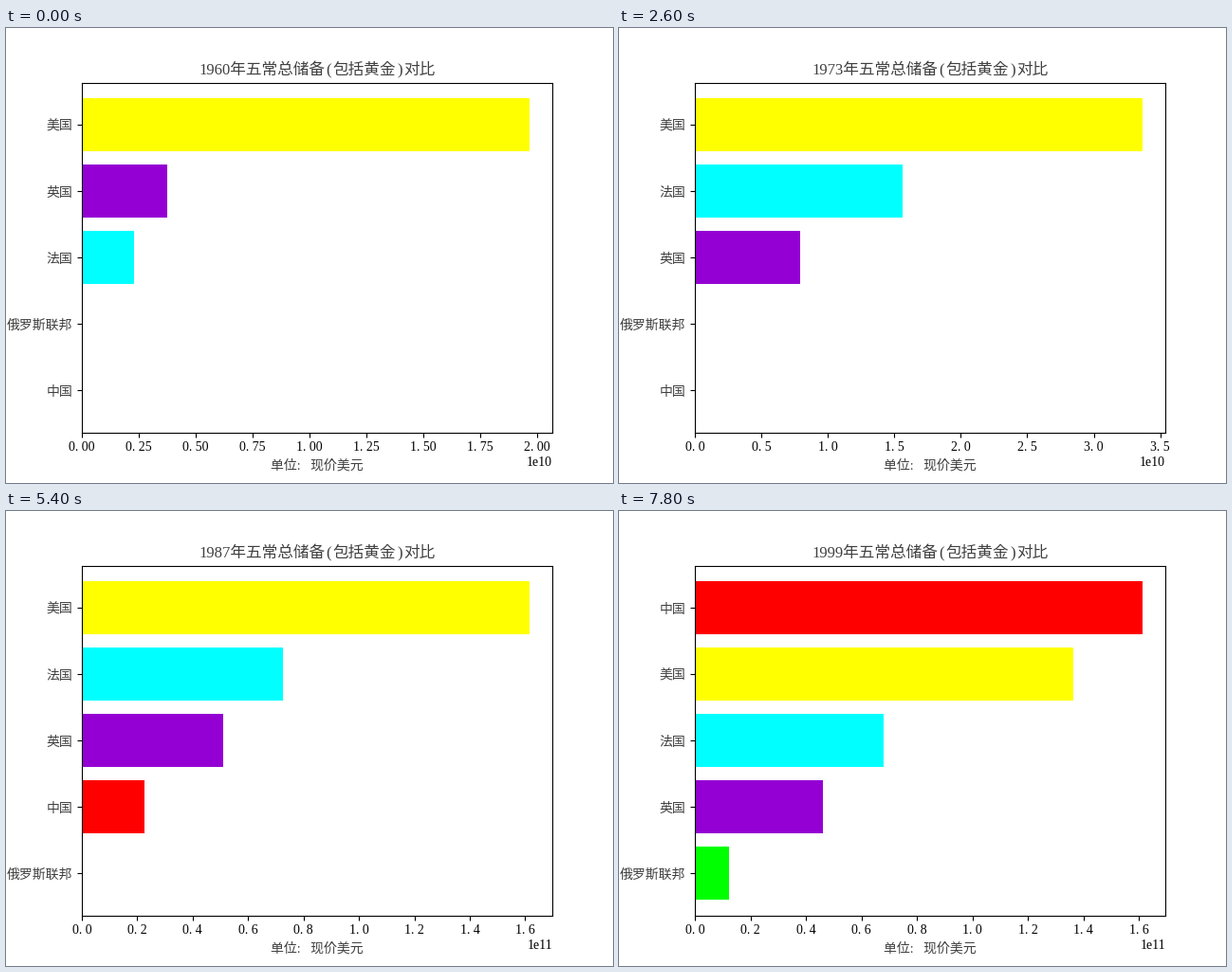
A matplotlib script that plays this animation: 640 px wide and 480 px high, repeating every 8 s.

```python
import math

import numpy as np
import matplotlib.pyplot as plt
from matplotlib.animation import FuncAnimation

W, H, DPI = 640, 480, 100
LEFT, RIGHT, BOTTOM = 80, 576, 427.2
FIRST, LAST = 1960, 1999
INK = "0.25"

plt.rcParams["font.family"] = ["Liberation Serif", "Noto Sans CJK JP"]

# Turning points of the leading reserve, in billions of dollars.
LEADER = {60: 19.67, 62: 17.2, 67: 14.9, 68: 17.85, 71: 14.7, 72: 20.6,
          73: 33.7, 74: 55.7, 75: 43.2, 76: 44.2, 78: 69.5, 79: 143.2,
          80: 171.4, 81: 124, 82: 143.4, 84: 104.8, 87: 161.7, 90: 173.1,
          91: 159.2, 95: 176, 97: 134.8, 99: 136.4}

# The others as shares of the leader at common years; early gaps are zero.
KNOTS = [60, 67, 68, 73, 77, 79, 84, 87, 91, 93, 97, 99]
COUNTRIES = [
    ("中国", "#ff0000", [0.203, 0.139, 0.302, 0.166, 1.086, 1.183]),
    ("俄罗斯联邦", "#00ff00", [0.06, 0.131, 0.09]),
    ("英国", "#9400d3", [0.191, 0.181, 0.152, 0.235, 0.446, 0.203,
                       0.146, 0.315, 0.305, 0.267, 0.279, 0.338]),
    ("法国", "#00ffff", [0.117, 0.471, 0.278, 0.464, 0.424, 0.415,
                       0.44, 0.449, 0.379, 0.332, 0.406, 0.498]),
    ("美国", "#ffff00", [1] * len(KNOTS)),
]


def reserves(year):
    """Rows of (value, name, colour), smallest first."""
    y = year - 1900
    lead = np.interp(y, list(LEADER), list(LEADER.values()))
    rows = []
    for name, color, shares in COUNTRIES:
        padded = [0] * (len(KNOTS) - len(shares)) + shares
        rows.append((lead * np.interp(y, KNOTS, padded), name, color))
    return sorted(rows, key=lambda row: row[0])


fig = plt.figure(figsize=(W / DPI, H / DPI), dpi=DPI, facecolor="white")


def put(x, y, text, size=10, ha="left", color=INK):
    """Write text with its baseline at stage pixel (x, y)."""
    fig.text(x / W, 1 - y / H, text, fontsize=size, ha=ha, va="baseline", color=color)


def nice_step(top):
    """Smallest round step giving at most nine intervals."""
    raw = top / 9
    unit = 10 ** math.floor(math.log10(raw))
    return next(m * unit for m in (1, 2, 2.5, 5, 10) if m * unit >= raw)


def draw_title(year):
    em = 12 * DPI / 72
    x0 = (LEFT + RIGHT) / 2 - 7.5 * em
    parts = [(0, f"{year}年五常总储备", "left"), (8.25, "(", "center"),
             (8.5, "包括黄金", "left"), (12.75, ")", "center"), (13, "对比", "left")]
    for offset, text, ha in parts:
        put(x0 + offset * em, 49, text, 12, ha)


def draw_x_labels(top):
    power = math.floor(math.log10(top))
    limit = top / 10 ** power
    step = nice_step(limit)
    digits = 2 if abs(step - 0.25) < 1e-9 else 1 if step < 0.99 else 0
    ticks = np.arange(0, limit, step)
    for t in ticks:
        # The space gives the point the width of a digit.
        label = f"{t:.{digits}f}".replace(".", ". ")
        put(LEFT + (RIGHT - LEFT) * t / limit, 446, label, ha="center", color="black")
    put(RIGHT, 462, f"1e{power + 9}", ha="right", color="black")
    put((LEFT + RIGHT) / 2, 466, "单位:   现价美元", ha="center")
    return ticks * 10 ** power


def draw(i):
    year = FIRST + i
    rows = reserves(year)
    top = rows[-1][0] * 1.05
    fig.clf()
    ax = fig.add_axes([0.125, 0.11, 0.775, 0.77])
    ax.barh(range(5), [r[0] for r in rows], color=[r[2] for r in rows])
    ax.set_xlim(0, top)
    ax.set_ylim(-0.64, 4.64)
    ax.set_yticks(range(5), [""] * 5)
    ticks = draw_x_labels(top)
    ax.set_xticks(ticks, [""] * len(ticks))
    for k, (_, name, _) in enumerate(rows):
        put(70, BOTTOM - 70 * (k + 0.64) + 5.3, name, ha="right")
    draw_title(year)
    return []


anim = FuncAnimation(fig, draw, frames=LAST - FIRST + 1, interval=200,
                     init_func=lambda: draw(0), repeat=True, repeat_delay=0)
plt.show()
```
